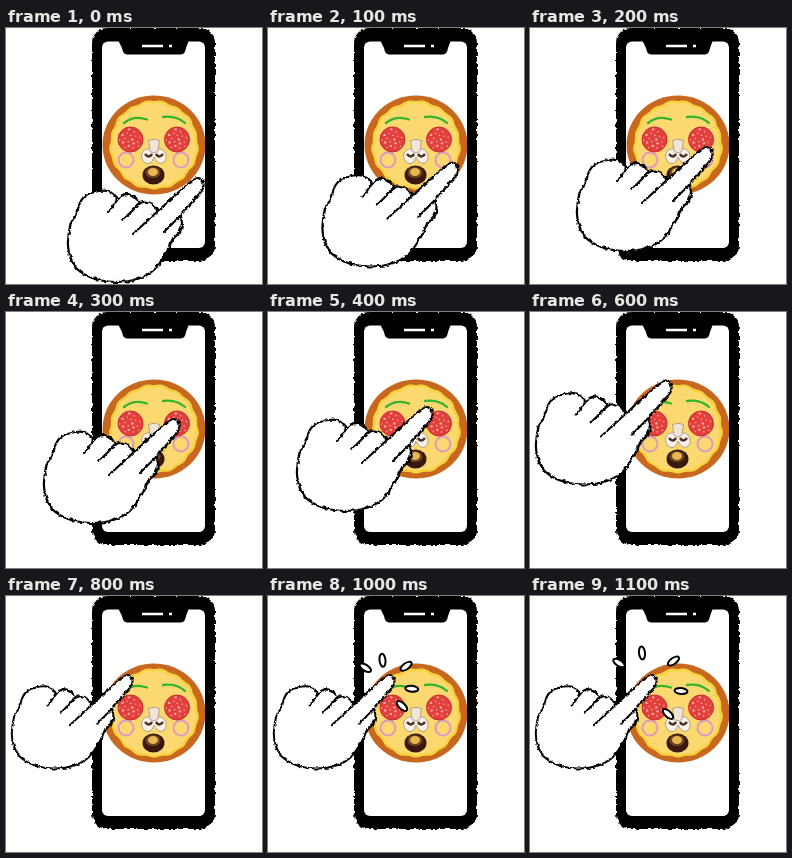
Recreate the animation shown at these times as an HTML page. Size 256 by 256 pixels, loop 1.2 s.

```html
<!DOCTYPE html>
<html lang="en">
<head>
<meta charset="utf-8">
<title>Pizza face tap</title>
<style>
  html, body { margin: 0; width: 100%; height: 100%; overflow: hidden; background: #fff; }
  svg { display: block; width: 100vw; height: 100vh; }
</style>
</head>
<body>
<svg viewBox="0 0 256 256">
  <defs>
    <filter id="rough" x="-10%" y="-10%" width="120%" height="120%" color-interpolation-filters="sRGB">
      <feTurbulence type="fractalNoise" baseFrequency=".22" numOctaves="2" seed="4"/>
      <feDisplacementMap in="SourceGraphic" scale="4" xChannelSelector="R" yChannelSelector="G"/>
    </filter>
    <clipPath id="screen"><rect x="96" y="13.5" width="103" height="206.5" rx="6"/></clipPath>
    <g id="pepperoni">
      <circle r="12.5" fill="#e2403d" stroke="#c92a2c"/>
      <g id="specks" fill="#f7aaa2"></g>
    </g>
  </defs>

  <g id="phone">
    <rect x="86" y="0" width="123" height="233" rx="15" filter="url(#rough)"/>
    <rect x="96" y="13.5" width="103" height="206.5" rx="6" fill="#fff"/>
    <path d="M112 12L116 20Q117 26.500 121 26.500H175Q179 26.500 180 20L183 12Z"/>
    <path d="M136 18H157M163 18H166" stroke="#fff" stroke-width="2.500"/>
  </g>

  <g id="pizza" clip-path="url(#screen)">
    <ellipse cx="148" cy="117" rx="51.500" ry="49.500" fill="#c8681f"/>
    <path id="base" fill="#fbd970" stroke="#f8d23c" stroke-width="2.500"/>
    <g fill="none" stroke-linecap="round">
      <path d="M118 95Q128 87 141 91.500M157 89Q170 87 179 95" stroke="#35b52c" stroke-width="2.300"/>
      <g stroke="#dc9bbd" stroke-width="2">
        <circle cx="120" cy="132" r="7.500"/>
        <circle cx="175" cy="132" r="7.500"/>
      </g>
    </g>
    <use href="#pepperoni" x="124.500" y="111.500"/>
    <use href="#pepperoni" x="171" y="111.500"/>
    <g stroke="#9a8371" stroke-width=".7">
      <path d="M148 121Q137 119 135.500 127Q136 136 143 135.500Q147 134 148 129Q150 134 154 135.500Q161 135 160 127Q158 119 148 121Z" fill="#f8f2ea"/>
      <path d="M142.500 112.500Q148 110 153.500 112.500L152 123Q148 127 144 123Z" fill="#f0e4d6"/>
    </g>
    <path d="M139 126Q143 131 146 126M150 126Q153 131 157 126" fill="none" stroke="#4a3024" stroke-width="2.500"/>
    <ellipse cx="147.500" cy="147" rx="11" ry="9.500" fill="#39190f"/>
    <ellipse cx="147" cy="144.500" rx="7.500" ry="5.500" fill="#70431f"/>
    <ellipse cx="147" cy="144" rx="5" ry="4" fill="#e8b650"/>
  </g>

  <g id="hand">
    <g filter="url(#rough)" stroke="#000" stroke-width="2.200" stroke-linejoin="round" stroke-linecap="round">
      <path fill="#fff" d="M122 6Q130 -2 135 3Q139 9 133 16L113 39Q117 44 113 55L105 63Q101 76 88 92Q74 105 48 105Q22 104 9 91Q0 78 1 64Q2 50 5 44Q10 38 11 32Q14 17 28 15Q46 10 50 22Q58 14 66 19Q71 22 72 27Q80 21 88 30L92 33Z"/>
      <path fill="none" d="M50 22Q46 30 41 35M72 27L56 43M92 33L66 57M113 39L97 55"/>
    </g>
  </g>
  <g id="rays" fill="#fff" stroke="#000" stroke-width="2"></g>
</svg>
<script>
const $ = id => document.getElementById(id);
const STEP = 100, STEPS = 12, TIP = [122, 86], PRESS = 8;

// Hand place for a step: left, top, horizontal and vertical scale
const keys = [
  [0, 61, 149, 1, 1], [2, 46, 118, 1, 1], [4, 28, 94, 1, 1], [6, 5, 67.5, 1, 1],
  [PRESS, 5, 78, 0.89, 0.9], [STEPS, 5, 78, 0.89, 0.9]
];

// Ray centre and tilt at full spread
const rays = [[89, 67, 32], [112, 57, 84], [143.5, 65, -35], [151, 95, 5], [138, 118, 42]];

function handAt(step) {
  const i = keys.findIndex(k => k[0] > step);
  const a = keys[i - 1], b = keys[i], p = (step - a[0]) / (b[0] - a[0]);
  return a.map((v, j) => v + (b[j] - v) * p).slice(1);
}

function draw(now) {
  const step = Math.floor(now / STEP) % STEPS;
  const [x, y, sx, sy] = handAt(step);
  $('hand').setAttribute('transform', `translate(${x} ${y}) scale(${sx} ${sy})`);
  const spread = step > PRESS ? 0.25 + (step - PRESS) * 0.25 : 0;
  $('rays').innerHTML = spread ? rays.map(([rx, ry, tilt]) => {
    const cx = TIP[0] + (rx - TIP[0]) * spread, cy = TIP[1] + (ry - TIP[1]) * spread;
    return `<ellipse rx="6.500" ry="3" transform="translate(${cx} ${cy}) rotate(${tilt})"/>`;
  }).join('') : '';
  requestAnimationFrame(draw);
}

// Wavy cheese edge
const edge = Array.from({ length: 120 }, (_, i) => {
  const a = i * Math.PI / 60, r = 43 + 0.6 * Math.sin(a * 17) + 0.4 * Math.sin(a * 7);
  return `${148 + r * Math.cos(a)} ${117 + r * Math.sin(a)}`;
});
$('base').setAttribute('d', `M${edge.join('L')}Z`);

$('specks').innerHTML = Array.from({ length: 18 }, (_, i) => {
  const r = 2.6 * Math.sqrt(i + 0.5), a = i * 2.4;
  return `<circle cx="${r * Math.cos(a)}" cy="${r * Math.sin(a)}" r="${i % 3 ? 0.8 : 1.2}"/>`;
}).join('');

requestAnimationFrame(draw);
</script>
</body>
</html>
```
